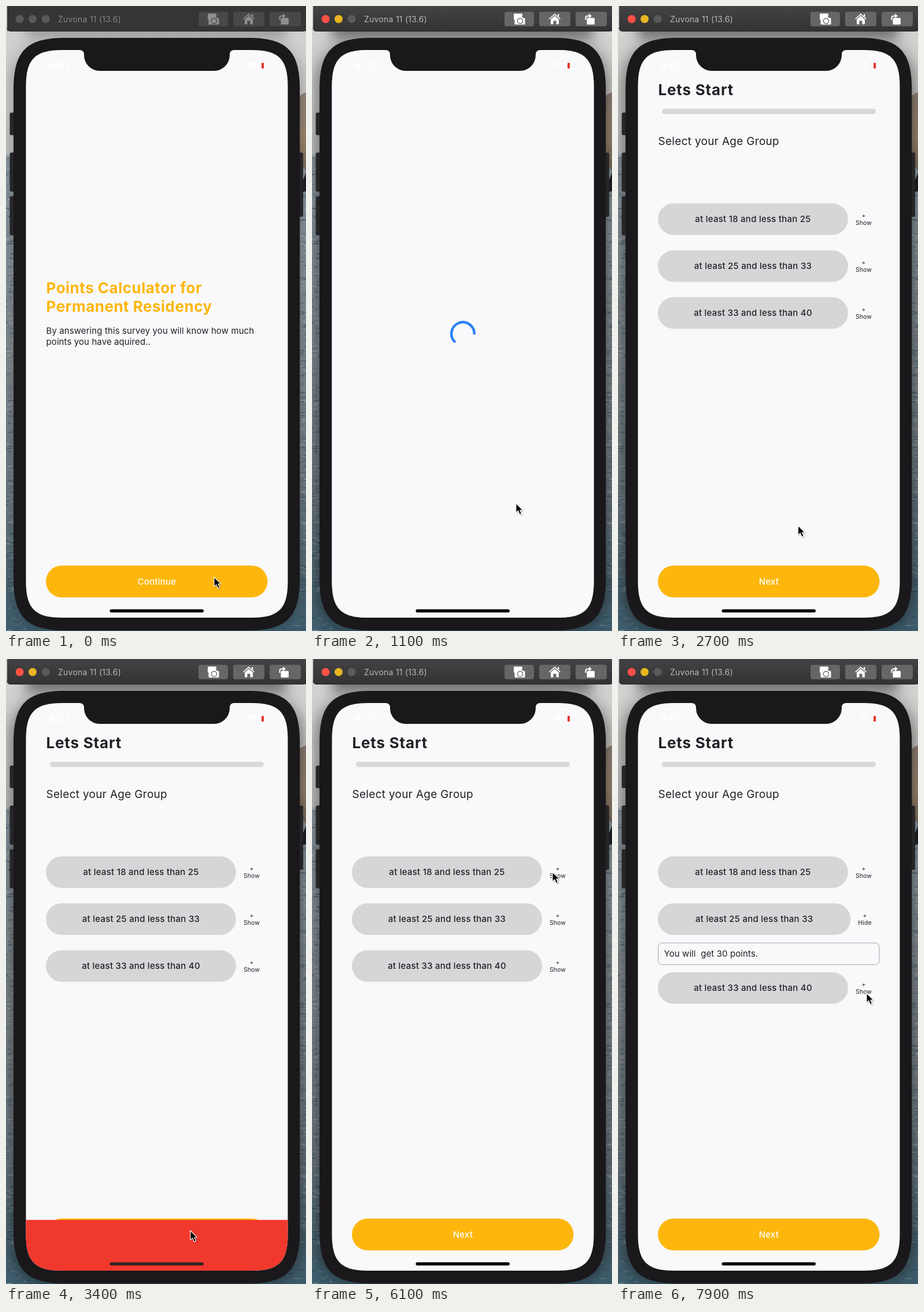
Write an HTML page that moves like this. It is 519 px wide and 1079 px high and loops after 8 s.

```html
<!DOCTYPE html>
<html lang="en">
<head>
<meta charset="utf-8">
<title>Points calculator</title>
<style>
  html, body { margin: 0; width: 100%; height: 100%; overflow: hidden; background: #8b8c8d; }
  svg { display: block; width: 519px; height: 1079px; }
  text { font-family: Inter, "Noto Sans", sans-serif; white-space: pre; fill: #222024; }
  .head { font-size: 26px; font-weight: 700; letter-spacing: .5px; }
  .amber { fill: #fdb70c; }
  .body { font-size: 15px; letter-spacing: .1px; }
  .ask { font-size: 19px; letter-spacing: .3px; }
  .pill { font-size: 15px; font-weight: 500; letter-spacing: .25px; text-anchor: middle; }
  .tiny { font-size: 10.5px; letter-spacing: .1px; text-anchor: middle; }
  .white { fill: #fff; }
</style>
</head>
<body>
<svg viewBox="0 0 519 1079" xmlns="http://www.w3.org/2000/svg">
  <defs>
    <linearGradient id="scene" x2="0" y2="1">
      <stop offset="0" stop-color="#d4d2d1"/>
      <stop offset=".16" stop-color="#cfcdcc"/>
      <stop offset=".236" stop-color="#c3c4c5"/>
      <stop offset=".244" stop-color="#8e9ba3"/>
      <stop offset=".35" stop-color="#8a959c"/>
      <stop offset=".6" stop-color="#818a90"/>
      <stop offset=".8" stop-color="#6d7a82"/>
      <stop offset="1" stop-color="#3d5d6d"/>
    </linearGradient>
    <linearGradient id="hill" x2="0" y2="1">
      <stop offset="0" stop-color="#96877d"/>
      <stop offset=".6" stop-color="#a08a72"/>
      <stop offset="1" stop-color="#7c6c5c"/>
    </linearGradient>
    <linearGradient id="bar" x2="0" y2="1">
      <stop offset="0" stop-color="#434244"/>
      <stop offset="1" stop-color="#333234"/>
    </linearGradient>
    <filter id="soft" x="-20%" y="-20%" width="140%" height="140%"><feGaussianBlur stdDeviation="14"/></filter>
    <filter id="softBar" x="-20%" y="-200%" width="140%" height="500%"><feGaussianBlur stdDeviation="11"/></filter>
    <filter id="glow" x="-50%" y="-50%" width="200%" height="200%"><feGaussianBlur stdDeviation="1.3"/></filter>
    <clipPath id="glass"><path id="pane"/></clipPath>
  </defs>

  <rect width="519" height="1079" fill="url(#scene)"/>
  <path d="M500 162L512 152L519 149V284L500 262Z" fill="url(#hill)"/>
  <path d="M506 322L514 300L519 288V320Z" fill="#1c2226"/>
  <g id="sea"></g>
  <g id="shade">
    <rect x="8" y="66" width="505" height="1012" rx="66" filter="url(#soft)"/>
    <rect x="35" y="0" width="450" height="58" filter="url(#softBar)"/>
  </g>

  <g fill="#262527">
    <rect x="6.5" y="184" width="12" height="39" rx="3"/>
    <rect x="6.5" y="253" width="12" height="67.5" rx="3"/>
    <rect x="6.5" y="328.5" width="12" height="67.5" rx="3"/>
    <rect x="502" y="253" width="12" height="111" rx="3"/>
  </g>
  <path id="shell" fill="#1a181b"/>

  <g clip-path="url(#glass)">
    <rect x="34" y="76" width="454" height="980" fill="#f9f8fb"/>
    <g id="intro">
      <text class="head amber" x="69.5" y="496">Points Calculator for</text>
      <text class="head amber" x="69.5" y="527.5">Permanent Residency</text>
      <text class="body" x="69.5" y="566">By answering this survey you will know how much</text>
      <text class="body" x="69.5" y="584.5">points you have aquired..</text>
      <rect x="69" y="966" width="383.5" height="55" rx="27.5" fill="#fdb70c"/>
      <text class="pill white" x="261" y="998.5">Continue</text>
    </g>
    <g id="wait">
      <rect x="34" y="76" width="454" height="980" fill="#f9f8fb"/>
      <path id="arc" fill="none" stroke="#2b82f3" stroke-width="4.4"/>
    </g>
    <g id="survey">
      <text class="head" x="69.5" y="153.5" style="letter-spacing:.8px">Lets Start</text>
      <rect x="76" y="177.5" width="370" height="9" rx="4.5" fill="#d8d7d9"/>
      <text class="ask" x="69.5" y="240">Select your Age Group</text>
      <g id="rows"></g>
      <rect x="69" y="966" width="383.5" height="55" rx="27.5" fill="#fdb70c"/>
      <text class="pill white" x="261" y="998.5">Next</text>
    </g>
    <g id="snack">
      <rect x="34" y="947" width="454" height="110" fill="#f1382d"/>
      <g id="note">
        <text class="body white" x="69.5" y="989">Select an Answer first.</text>
        <circle cx="439.2" cy="984" r="10.9" fill="#fff"/>
        <path d="M439.2 978.5V985.5M439.2 988V990.3" stroke="#f1382d" stroke-width="2.3"/>
      </g>
    </g>
    <rect id="home" x="179.5" y="1041.5" width="162.5" height="5.5" rx="2.75"/>
    <g fill="#fff">
      <text class="white" x="73" y="109" font-size="17" font-weight="600" letter-spacing=".4">8:01</text>
      <circle cx="397" cy="107" r="1.3"/><circle cx="402" cy="107" r="1.3"/><circle cx="407" cy="107" r="1.3"/>
      <path d="M418 100Q426 93 434 100L431.5 102.5Q426 98 420.5 102.5ZM422 104Q426 101 430 104L426 108.5Z"/>
      <rect x="440.5" y="96.5" width="22.5" height="13" rx="3.5" fill="none" stroke="#fff"/>
      <path d="M464.5 101V105.5H466V101Z"/>
    </g>
    <rect x="442" y="98" width="4.2" height="10" rx="1.5" fill="#e33a30"/>
  </g>
  <path d="M124 70V76H127Q135 76 135 84V85A27 27 0 0 0 162 112H360A27 27 0 0 0 387 85V84Q387 76 395 76H398V70Z" fill="#1a181b"/>

  <path d="M2 0H519V43.5H8Q2 43.5 2 37.5Z" fill="url(#bar)"/>
  <path d="M2 37.5Q2 43.5 8 43.5H513Q519 43.5 519 37.5" fill="none" stroke="#232224"/>
  <rect id="dim" x="2" y="0" width="517" height="43" fill="#353436"/>
  <g id="lights">
    <circle cx="23.6" cy="22.5" r="7"/><circle cx="46" cy="22.5" r="7"/><circle cx="68.7" cy="22.5" r="7"/>
  </g>
  <text id="label" x="90" y="28" font-size="14" letter-spacing=".25">Zuvona 11 (13.6)</text>
  <g id="keys">
    <rect x="333" y="10" width="51" height="25" rx="4"/>
    <rect x="393" y="10" width="54" height="25" rx="4"/>
    <rect x="456" y="10" width="54" height="25" rx="4"/>
  </g>
  <g id="icons">
    <path d="M350.5 13H362Q364 13 364 15V17L351 23.5H349V15Q349 13 350.5 13Z"/>
    <path d="M352 20.5H355L357 18H363L365 20.5H367Q368.5 20.5 368.5 22V30.5Q368.5 32 367 32H352Q350.5 32 350.5 30.5V22Q350.5 20.5 352 20.5Z"/>
    <circle class="hole" cx="360" cy="25.8" r="4.6" fill="none" stroke-width="1.4"/>
    <path d="M420 13L430 22L429 23.3L420 15.3L411 23.3L410 22ZM420 17L427 23.3V31.5H422.5V25.5H417.5V31.5H413V23.3ZM425 14H427.3V19L425 17Z"/>
    <rect x="475.5" y="20.5" width="13.5" height="11.5" rx="1.5"/>
    <path d="M472.5 24V20Q472.5 16.3 477 16.3H479V13L484 17.3L479 21V18.2H477Q474.5 18.2 474.5 20.5V24Z"/>
  </g>

  <g id="mouse">
    <path d="M1 2V18L5 14.5L8 21L11 19.5L8.5 13.5H13.5Z" opacity=".35" filter="url(#glow)"/>
    <path d="M0 0V16.2L3.7 12.8L6.5 19.3L9.6 18L6.8 11.7H11.8Z" stroke="#fff" stroke-width="1.1" stroke-linejoin="round"/>
  </g>
</svg>
<script>
const LOOP = 8000;
const NS = 'http://www.w3.org/2000/svg';
const $ = id => document.getElementById(id);
const clamp = v => Math.max(0, Math.min(1, v));
const show = (el, on) => el.setAttribute('display', on ? 'inline' : 'none');
const shift = (el, x, y) => el.setAttribute('transform', `translate(${x} ${y})`);
const paint = (el, color) => el.setAttribute('fill', color);

function add(parent, tag, attrs, text) {
  const el = document.createElementNS(NS, tag);
  for (const k in attrs) el.setAttribute(k, attrs[k]);
  if (text) el.textContent = text;
  return parent.appendChild(el);
}

// Rectangle whose corners blend gradually into the sides
function smoothRect(x, y, w, h, r) {
  const e = 1.36 * r, c = .34 * r, R = x + w, B = y + h;
  return `M${x + e} ${y}H${R - e}C${R - c} ${y} ${R} ${y + c} ${R} ${y + e}` +
    `V${B - e}C${R} ${B - c} ${R - c} ${B} ${R - e} ${B}` +
    `H${x + e}C${x + c} ${B} ${x} ${B - c} ${x} ${B - e}` +
    `V${y + e}C${x} ${y + c} ${x + c} ${y} ${x + e} ${y}Z`;
}
$('pane').setAttribute('d', smoothRect(34.5, 76, 453, 980, 46));
$('shell').setAttribute('d', smoothRect(13, 55, 495.3, 1023, 66));

// Cubic Bezier easing solved by bisection
function bezier(x1, y1, x2, y2) {
  const at = (a, b, u) => 3 * a * u * (1 - u) ** 2 + 3 * b * u * u * (1 - u) + u ** 3;
  return x => {
    if (x <= 0 || x >= 1) return clamp(x);
    let lo = 0, hi = 1;
    for (let i = 0; i < 24; i++) {
      const mid = (lo + hi) / 2;
      if (at(x1, x2, mid) < x) lo = mid; else hi = mid;
    }
    return at(y1, y2, lo);
  };
}
const standard = bezier(.4, 0, .2, 1);
const pageEase = bezier(.35, .91, .33, .97);

// Water ripples
let seed = 7;
const rnd = () => (seed = seed * 16807 % 2147483647) / 2147483647;
for (let i = 0; i < 640; i++) {
  const y = 262 + 817 * rnd(), left = rnd() < .5;
  const low = y > 1015;
  const x = left ? rnd() * (low ? 45 : 14) - 3 : 519 - rnd() * (low ? 45 : 13);
  if (!left && y < 325) continue;
  const w = 3 + rnd() * 9, dark = rnd() < .55;
  add($('sea'), 'path', {
    d: `M${x} ${y}q${w / 2} ${rnd() * 3 - 1.5} ${w} ${rnd() * 3 - 1.5}`,
    fill: 'none', stroke: dark ? '#22414f' : '#bcc4c8',
    'stroke-width': .6 + rnd() * 1.2, opacity: .2 + rnd() * .35
  });
}

// Answer rows
const rows = [['18 and less than 25', 25], ['25 and less than 33', 30], ['33 and less than 40', 25]].map(([range, points]) => {
  const g = add($('rows'), 'g', {});
  const pill = add(g, 'rect', { x: 69, y: 0, height: 54.5, rx: 27.25, fill: '#d7d5d8' });
  const name = add(g, 'text', { class: 'pill', y: 32.5 }, 'at least ' + range);
  const plus = add(g, 'text', { class: 'tiny', y: 24.5 }, '+');
  const word = add(g, 'text', { class: 'tiny', y: 37.5 }, 'Show');
  const box = add(g, 'g', {});
  add(box, 'rect', { x: 69.5, y: 68.5, width: 382.5, height: 37.5, rx: 7, fill: 'none', stroke: '#a5a3a7' });
  add(box, 'text', { class: 'body', x: 79.5, y: 92.5 }, `You will  get ${points} points.`);
  return { g, pill, name, plus, word, box };
});

function drawRows(open) {
  let y = 340.7;
  rows.forEach((r, i) => {
    const on = i === open, w = on ? 333.5 : 329;
    shift(r.g, 0, y);
    r.pill.setAttribute('width', w);
    r.name.setAttribute('x', 69 + w / 2);
    r.plus.setAttribute('x', on ? 427 : 425);
    r.word.setAttribute('x', on ? 427 : 425);
    r.word.textContent = on ? 'Hide' : 'Show';
    show(r.box, on);
    y += on ? 119 : 81;
  });
}

function drawSpinner(t) {
  const p = t / 1333 % 1;
  const head = standard(clamp(p * 2)), tail = standard(clamp(p * 2 - 1));
  const from = (-90 + 270 * tail + 360 * t / 2222 + 90 * p) * Math.PI / 180;
  const sweep = Math.max(.02, 1.5 * Math.PI * (head - tail));
  const pt = a => `${261 + 19.8 * Math.cos(a)} ${565.7 + 19.8 * Math.sin(a)}`;
  $('arc').setAttribute('d', `M${pt(from)}A19.8 19.8 0 ${sweep > Math.PI ? 1 : 0} 1 ${pt(from + sweep)}`);
}

// time, x, y
const path = [
  [0, 360, 986], [450, 360, 986], [1100, 353, 859], [1700, 290, 599], [2050, 287, 603],
  [2900, 319, 987], [3550, 319, 987], [4600, 334, 471], [5300, 398, 384], [6100, 416, 368],
  [6750, 418, 369], [7000, 427, 449], [7300, 427, 450], [7900, 430, 577], [8000, 430, 577]
];
function drawMouse(t) {
  const i = Math.max(1, path.findIndex(k => k[0] > t));
  const [a, b] = [path[i - 1], path[i]], k = (t - a[0]) / (b[0] - a[0]);
  shift($('mouse'), a[1] + (b[1] - a[1]) * k, a[2] + (b[2] - a[2]) * k);
}

function drawWindow(active) {
  $('shade').setAttribute('opacity', active ? .46 : .24);
  show($('dim'), !active);
  const colors = active ? ['#ff5047', '#e6b521', '#5a595b'] : ['#5a595b', '#5a595b', '#5a595b'];
  [...$('lights').children].forEach((c, i) => paint(c, colors[i]));
  $('label').style.fill = active ? '#b9b8ba' : '#858486';
  const key = active ? '#666567' : '#484749';
  paint($('keys'), key);
  paint($('icons'), active ? '#fff' : '#8e8d8f');
  document.querySelector('.hole').setAttribute('stroke', key);
}

const PUSH = 300, LOADED = 1500, SNACK = 3270, SNACK_END = 5515;
function draw(t) {
  drawWindow(t >= 100);

  const slide = pageEase(clamp((t - PUSH) / 400));
  show($('intro'), slide < 1);
  shift($('intro'), -151 * slide, 0);
  show($('wait'), t >= PUSH && t < LOADED);
  shift($('wait'), 453 * (1 - slide), 0);
  drawSpinner(Math.max(0, t - PUSH));

  show($('survey'), t >= LOADED);
  drawRows(t >= 7100 ? 1 : t >= 6300 && t < 6700 ? 0 : -1);

  const rise = t < SNACK_END ? clamp((t - SNACK) / 250) : 1 - clamp((t - SNACK_END) / 250);
  show($('snack'), rise > 0);
  shift($('snack'), 0, 109 * (1 - standard(rise)));
  $('note').setAttribute('opacity', standard(clamp((rise - .6) / .4)));
  paint($('home'), rise > .1 ? '#352523' : '#000');

  drawMouse(t);
}

function tick() {
  draw(performance.now() % LOOP);
  requestAnimationFrame(tick);
}
tick();
</script>
</body>
</html>
```
